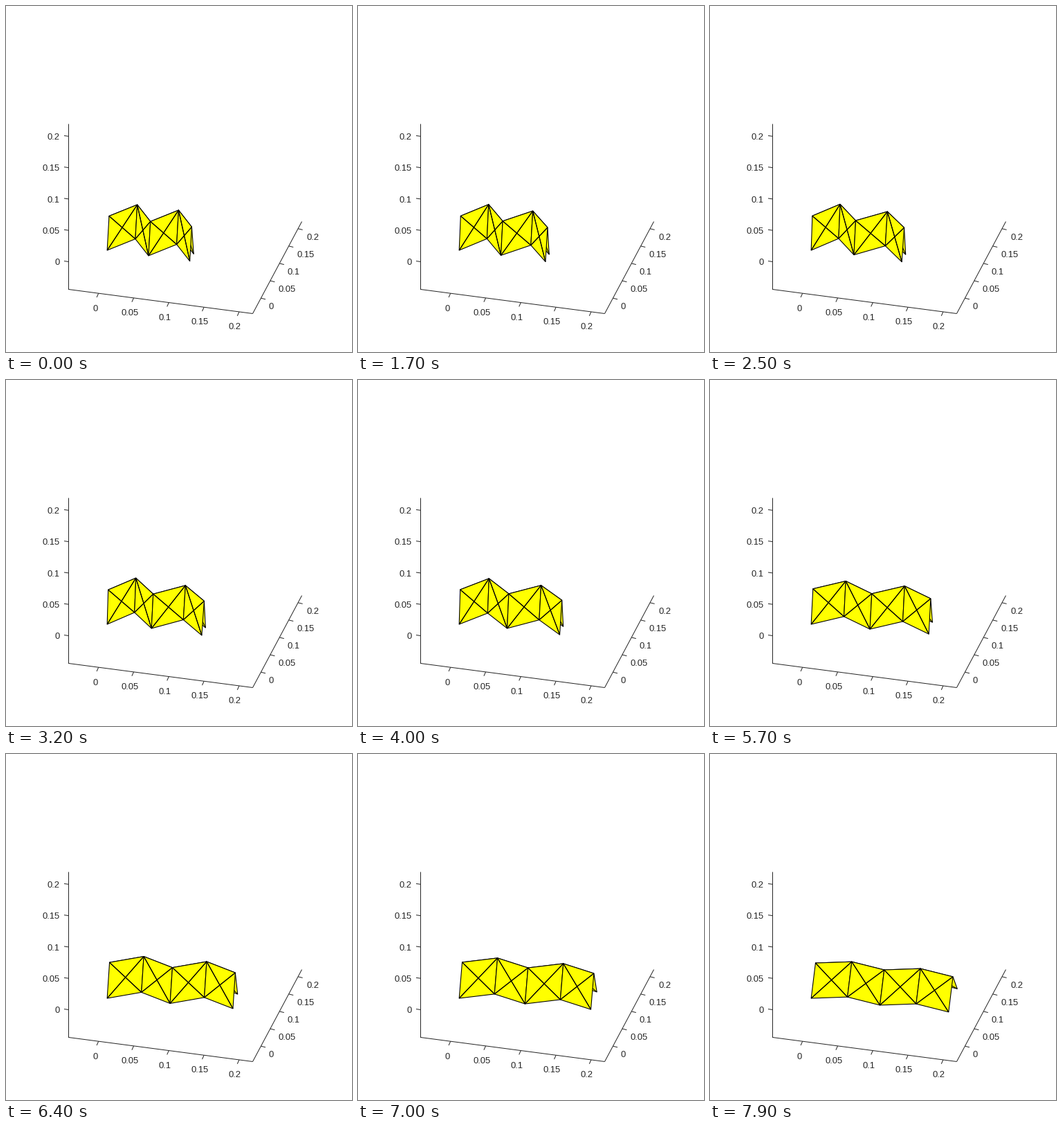
A matplotlib script for the animation above (8000 ms loop, 500 px wide and 500 px high).

```python
import numpy as np
import matplotlib.pyplot as plt
from matplotlib.animation import FuncAnimation
from matplotlib.collections import LineCollection, PolyCollection

SIZE, DPI = 500, 100
PX = 72 / DPI
GREY = "#262626"
STEP_MS, FRAMES, HOLD = 100, 80, 4
STEPS = FRAMES - 1 - HOLD

# Screen direction of one unit along x, y and z
VIEW = np.array([[1016, 134], [268, -502], [0, -905]])
ANCHOR = np.array([146.2, 353.0])
SIDE = 0.05


def fold_angles(step):
    """Headings of the four zigzag panels, in degrees."""
    u = step / STEPS
    swell = np.sin(np.pi * min(step, 56) / 56) ** 2
    late = max(0, (step - 28) / (STEPS - 28))
    up = 54 - 35 * late ** 1.5 + 2 * swell
    down = 54 - 42 * u ** 2.1 * (1.25 - 0.25 * u ** 5)
    return [up, -down, up - 12.5 * swell, 2.5 * swell - down], swell


def roof(step):
    """Screen points of the front foot, ridge and back foot lines."""
    u = step / STEPS
    angles, swell = fold_angles(step)
    a = np.radians(angles)
    tilt = np.radians(12 + 29 * u ** 4)

    foot = np.zeros((5, 3))
    foot[1:, 0] = SIDE * np.cumsum(np.cos(a))
    foot[1:, 1] = SIDE * np.cumsum(np.sin(a))

    lean = -0.0025 * u
    out, height = SIDE * np.sin(tilt), SIDE * np.cos(tilt)
    ridge = foot + [lean, out, height]
    ridge[:, 0] += 0.0005 * swell * (np.arange(5) - 1)
    back = ridge + [lean, out, -height]
    return [ANCHOR + line @ VIEW for line in (foot, ridge, back)]


def panels(low, top):
    """Each panel outline followed by its two diagonals."""
    for i in range(4):
        yield [low[i], top[i], top[i + 1], low[i + 1]]
        yield [low[i], top[i + 1]]
        yield [top[i], low[i + 1]]


fig = plt.figure(figsize=(SIZE / DPI, SIZE / DPI), dpi=DPI, facecolor="white")
ax = fig.add_axes([0, 0, 1, 1])
ax.set_xlim(0, SIZE)
ax.set_ylim(SIZE, 0)
ax.axis("off")


def rule(x0, y0, x1, y1):
    ax.plot([x0, x1], [y0, y1], color=GREY, lw=PX, snap=False,
            solid_capstyle="butt")


def label(x, y, text, ha):
    ax.text(x, y + 4.8, text, ha=ha, va="baseline", color=GREY,
            family="Liberation Sans", size=13 * PX)


rule(90.5, 170.5, 90.5, 410)
rule(90.5, 409.5, 356.5, 444.5)
rule(356.5, 444.5, 427.5, 311.5)

for i, text in enumerate(["0", "0.05", "0.1", "0.15", "0.2"]):
    z = 369.5 - 45.3 * i
    rule(90.5, z, 84, z - 0.9)
    label(78, z, text, "right")

    x, y = 133.7 + 50.8 * i, 415.2 + 6.7 * i
    rule(x, y, x - 2.6, y + 5.8)
    label(129 + 50.4 * i, 436 + 6.5 * i, text, "center")

    x, y = 368.5 + 13.4 * i, 422.2 - 25.1 * i
    rule(x, y, x + 6.5, y + 1.6)
    label(379.5 + 13.7 * i, 433.6 - 25.2 * i, text, "left")

faces = PolyCollection([], facecolors="#ffff00", edgecolors="black",
                       linewidths=1.1 * PX, joinstyle="round", zorder=3)
crosses = LineCollection([], colors="black", linewidths=1.1 * PX, zorder=4)
ax.add_collection(faces, autolim=False)
ax.add_collection(crosses, autolim=False)


def draw(frame):
    foot, ridge, back = roof(max(0, frame - HOLD))
    front = list(panels(foot, ridge))
    # The back side goes first, so the front hides most of it
    faces.set_verts(list(panels(back, ridge)) + front)
    crosses.set_segments([part for part in front if len(part) == 2])
    return faces, crosses


anim = FuncAnimation(fig, draw, frames=FRAMES, interval=STEP_MS,
                     init_func=lambda: draw(0), repeat=True, repeat_delay=0)
plt.show()
```
